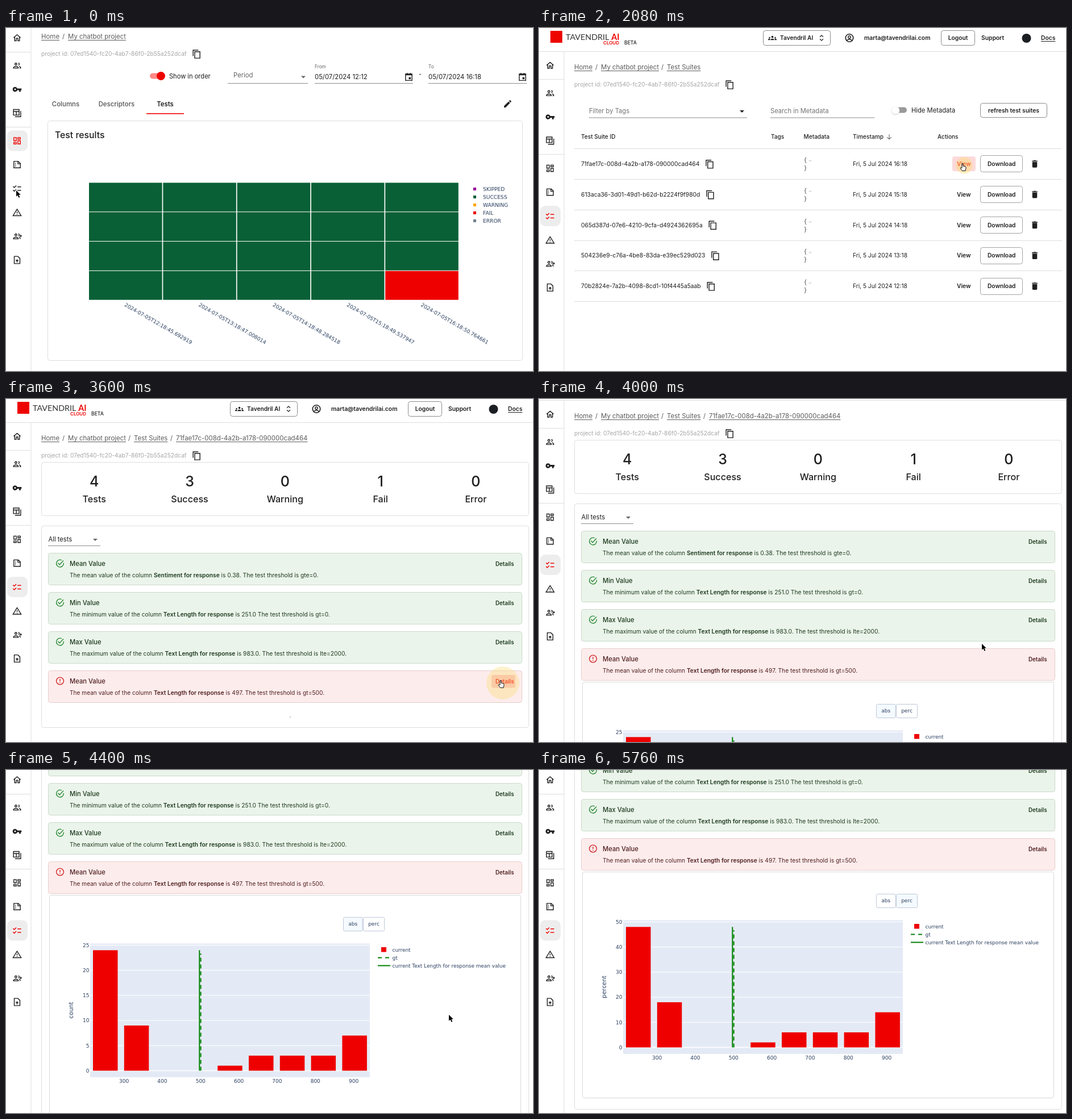
Recreate the animation shown at these times as an HTML page with a canvas. Size 927 by 604 pixels, loop 6320 ms.

```html
<!DOCTYPE html>
<html lang="en">
<head>
<meta charset="utf-8">
<title>Test suites walkthrough</title>
<style>
html, body { margin: 0; width: 100%; height: 100%; overflow: hidden; background: #fff; }
canvas { display: block; width: 927px; height: 604px; }
</style>
</head>
<body>
<canvas id="stage"></canvas>
<script>
const W = 927, H = 604, LOOP = 6320, STEP = 80;
const RED = '#ed0400', INK = '#1f1f1f', GREY = '#666', LINE = '#dedede', SLATE = '#2a3f5f';
const SANS = 'Inter, sans-serif', PLOT = '"DejaVu Sans", sans-serif';
const canvas = document.getElementById('stage');
const g = canvas.getContext('2d');
const dpr = window.devicePixelRatio || 1;
canvas.width = W * dpr;
canvas.height = H * dpr;

// Icons on a 24 unit grid: stroked part | filled part
const person = 'M3 18.5c0-5.5 12-5.5 12 0zM9 6a2.5 2.5 0 1 0 .1 0z';
const ICONS = {
  home: 'M3.5 11.5 12 4l8.5 7.5M6 10v9h4v-6h4v6h4v-9',
  people: person + 'M15 6a2.5 2.5 0 0 1 0 5M17 14q4 1 4 4.5h-3',
  key: '|M12.6 10a6 6 0 1 0 0 4H17v4h4v-4h2v-4zM7 14a2 2 0 1 1 .1 0z',
  table: 'M3 3h14v14H3zM3 8h14M10 8v9M21 7v14H7',
  board: 'M4 4h6v8H4zM14 4h6v4h-6zM14 12h6v8h-6zM4 16h6v4H4z',
  report: 'M4 4h11l5 5v11H4zM14 4v6h6M7 9h2M7 12.5h2M7 16h2',
  checks: 'M2 7l3 3 5-5M2 16l3 3 5-5M13 8h9M13 17h9',
  warn: 'M12 4 22 20H2zM12 10v4M12 16v2',
  invite: person + 'M15 6a2.5 2.5 0 0 1 0 5M17 14q3 1 3 4.5M21 8v6M18 11h6',
  upload: 'M5 3h9l5 5v13H5zM12 18v-6M9 14.5l3-3 3 3',
  copy: 'M3 17V2h13M7 6h13v16H7z',
  calendar: 'M4 5h16v16H4zM4 7h16M8 2v3M16 2v3|M12 13h5v5h-5z',
  pencil: '|M3 17.2V21h3.8L17.8 9.9l-3.7-3.7zM20.7 7a1 1 0 0 0 0-1.4l-2.3-2.3a1 1 0 0 0-1.4 0l-1.8 1.8 3.7 3.7z',
  trash: '|M6 19a2 2 0 0 0 2 2h8a2 2 0 0 0 2-2V7H6zM19 4h-3.5l-1-1h-5l-1 1H5v2h14z',
  account: 'M12 3a9 9 0 1 0 .1 0zM6 18q6-6 12 0M12 7a3 3 0 1 0 .1 0z',
  group: '|M7 18v-2q5-4 10 0v2zM12 6a3 3 0 1 0 .1 0zM0 18v-2q2-3 6-2-1 2-1 4zM24 18v-2q-2-3-6-2 1 2 1 4zM4 9a2 2 0 1 0 .1 0zM20 9a2 2 0 1 0 .1 0z',
  pass: 'M21 11v1a9 9 0 1 1-5-8M7 11l4 4L20.5 5',
  fail: 'M12 3a9 9 0 1 0 .1 0zM12 7v6M12 15v2',
  sorter: 'M7 9l5-5 5 5M7 15l5 5 5-5',
  down: 'M12 4v15M5 13l7 7 7-7',
  chevron: 'M6 9l6 6 6-6'
};
for (const k in ICONS) ICONS[k] = ICONS[k].split('|').map(d => new Path2D(d));
const ARROW = new Path2D('M0 0v10.8l2.5-2.3 1.9 4.2 1.9-.8-1.9-4.1h3.4z');
const HAND = new Path2D('M-1 0q1-1.2 2 0v4l4 1q1.5 .5 1 2.5l-1 5h-5.5l-3.5-5q.5-1.5 3 0z');

function icon(name, x, y, color = INK, size = 17) {
  const [stroke, fill] = ICONS[name], k = size / 24;
  g.save();
  g.translate(x - size / 2, y - size / 2);
  g.scale(k, k);
  g.lineWidth = 2;
  g.strokeStyle = g.fillStyle = color;
  g.stroke(stroke);
  if (fill) g.fill(fill, 'evenodd');
  g.restore();
}

// y is the middle of the capitals; returns the right edge
function text(s, x, y, size, { c = INK, w = 400, a = 'left', f = SANS, u = false } = {}) {
  g.font = `${w} ${size}px ${f}`;
  g.textAlign = a;
  g.fillStyle = c;
  g.fillText(s, x, y + size * 0.364);
  const width = g.measureText(s).width;
  if (u) rule(x, x + width, Math.round(y + size * 0.364) + 2.5, c);
  return x + width;
}
const bold = (s, x, y, size, o) => text(s, x, y, size, { w: 600, ...o });
const plot = (s, x, y, size, o) => text(s, x, y, size, { f: PLOT, c: SLATE, ...o });

function rule(x0, x1, y, c = LINE, lw = 1) {
  seg(x0, y, x1, y, c, lw);
}
function seg(x0, y0, x1, y1, c, lw = 1, dash = []) {
  g.setLineDash(dash);
  g.strokeStyle = c;
  g.lineWidth = lw;
  g.beginPath();
  g.moveTo(x0, y0);
  g.lineTo(x1, y1);
  g.stroke();
  g.setLineDash([]);
}
function rect(x, y, w, h, c) {
  g.fillStyle = c;
  g.fillRect(x, y, w, h);
}
function box(x0, y0, x1, y1, r, fill, stroke) {
  g.beginPath();
  g.roundRect(x0, y0, x1 - x0, y1 - y0, r);
  if (fill) { g.fillStyle = fill; g.fill(); }
  if (stroke) { g.strokeStyle = stroke; g.lineWidth = 1; g.stroke(); }
}
function disc(x, y, r, c) {
  g.fillStyle = c;
  g.beginPath();
  g.arc(x, y, r, 0, 7);
  g.fill();
}
function caret(x, y, c = GREY) {
  g.fillStyle = c;
  g.beginPath();
  g.moveTo(x - 4, y - 2);
  g.lineTo(x + 4, y - 2);
  g.lineTo(x, y + 2);
  g.fill();
}
function shifted(dy, draw) {
  g.save();
  g.translate(0, dy);
  draw();
  g.restore();
}
const ease = u => (u = Math.min(1, Math.max(0, u)), u * u * (3 - 2 * u));
const within = (t, a, b) => t >= a && t < b;

function header() {
  rect(20, 5, 21, 21, RED);
  const logo = 'Lato, sans-serif';
  const end = text('TAVENDRIL', 47, 15.5, 14.3, { f: logo, c: '#333' });
  bold('AI', end + 4, 15.5, 14.3, { f: logo, c: RED, w: 700 });
  bold('CLOUD', 113, 26.5, 8, { c: RED });
  text('BETA', 150, 26, 8.6, { w: 500 });
  box(394.5, 4.5, 512.5, 30.5, 4, null, '#8c8c8c');
  icon('group', 410.5, 17.5, INK, 15);
  bold('Tavendril AI', 424, 17.5, 10.2);
  icon('sorter', 497, 17.5, INK, 14);
  icon('account', 546, 17.5, INK, 18);
  bold('marta@tavendrilai.com', 572, 17.5, 10.3);
  box(707.5, 4.5, 766.5, 30.5, 4, null, '#8c8c8c');
  bold('Logout', 737, 17.5, 10.3, { a: 'center' });
  bold('Support', 778, 17.5, 10.3);
  disc(857.5, 18, 8, '#1b1f23');
  bold('Docs', 883, 17.5, 10.3, { u: true });
  rule(0, W, 41.5);
}

const MENU = { home: 66, people: 114.5, key: 156.5, table: 198.3, board: 247, report: 289,
  checks: 331, warn: 373.3, invite: 415.3, upload: 457 };
function sidebar(t, off) {
  const onBoard = t < 800, pressed = within(t, 240, 1280);
  const cell = y => box(2, y - 18, 38, y + 18, 9, '#ededed');
  seg(44, Math.max(0, 41 - off), 44, H, LINE);
  for (const y of [90, 222]) rule(0, 44, Math.round(y - off) + 0.5);
  if (onBoard) cell(MENU.board - off);
  if (t >= 1280) cell(MENU.checks - off);
  if (pressed) disc(19.5, MENU.checks - off, 17.5, t < 400 ? 'rgba(237,4,0,.05)' : 'rgba(220,0,20,.15)');
  for (const k in MENU) {
    const red = k === 'board' ? t < 1280 : k === 'checks' && t >= 240;
    icon(k, 19.5, MENU[k] - off, red ? RED : INK);
  }
}
function tooltip(off) {
  box(48, 322 - off, 103, 340 - off, 3, '#686868');
  text('Test Suites', 75.5, 331 - off, 8.1, { c: '#fff', a: 'center', w: 500 });
}

const SUITES = ['71fae17c-008d-4a2b-a178-090000cad464', '613aca36-3d01-49d1-b62d-b2224f9f980d',
  '065d387d-07e6-4210-9cfa-d4924362695a', '504236e9-c76a-4be8-83da-e39ec529d023',
  '70b2824e-7a2b-4098-8cd1-10f4445a5aab'];
function crumbs(depth) {
  const xs = [62, 109, 225, 299];
  ['Home', 'My chatbot project', 'Test Suites', SUITES[0]].slice(0, depth).forEach((s, i) => {
    text(s, xs[i], 69, 11.45, { c: '#5c5c5c', u: true });
    if (i) text('/', xs[i] - 8, 69, 11.45, { c: '#5c5c5c', a: 'center' });
  });
  text('project id: 07ed1540-fc20-4ab7-86f0-2b55a252dcaf', 62, 99.5, 10.2, { c: '#a6a6a6' });
  icon('copy', 335.5, 100);
}

function dashboard() {
  box(253, 79.5, 278, 89.5, 5, '#ff8a87');
  disc(272.5, 84.5, 7.5, RED);
  text('Show in order', 287, 84.5, 11.1);
  text('Period', 400, 83, 11.3, { c: GREY });
  caret(523, 86.5);
  rule(390, 531, 97.5, '#8c8c8c');
  text('-', 728.5, 81, 11, { a: 'center' });
  [['From', '12:12', 543], ['To', '16:18', 743]].forEach(([label, hour, x]) => {
    text(label, x, 68, 8.3, { c: GREY });
    text('05/07/2024 ' + hour, x, 86, 11.3);
    icon('calendar', x + 165.5, 86);
    rule(x, x + 173, 97.5, '#8c8c8c');
  });
  bold('Columns', 105, 133.5, 11.3, { c: GREY, a: 'center' });
  bold('Descriptors', 194.5, 133.5, 11.3, { c: GREY, a: 'center' });
  bold('Tests', 280, 133.5, 11.3, { a: 'center' });
  rect(247, 150, 66, 1.6, RED);
  icon('pencil', 882.5, 133.5);
  box(73.5, 163.5, 908.5, 585.5, 4, null, LINE);
  text('Test results', 86, 188, 15.8, { w: 500 });
  for (let c = 0; c < 5; c++) {
    const x = 146 + 130.3 * c;
    for (let r = 0; r < 4; r++)
      rect(x, 272.5 + 51.8 * r, 128.6, 50.8, c === 4 && r === 3 ? '#ee0000' : '#0a6036');
    const sec = ['45.692919', '47.008014', '48.284518', '49.537947', '50.764661'][c];
    g.save();
    g.translate(x + 63.5, 486.5);
    g.rotate(Math.PI / 6);
    plot(`2024-07-05T${12 + c}:18:${sec}`, 0, 0, 9);
    g.restore();
  }
  const legend = { SKIPPED: '#990099', SUCCESS: '#0a5f38', WARNING: '#ffa500', FAIL: RED, ERROR: '#708090' };
  Object.entries(legend).forEach(([name, c], i) => {
    rect(822, 281 + 14 * i, 5, 5, c);
    plot(name, 839, 283.5 + 14 * i, 9.1);
  });
}

function suiteList(t) {
  text('Filter by Tags', 88, 146, 11.2, { c: '#737373' });
  caret(357, 147, INK);
  rule(88, 366, 158, '#8c8c8c');
  text('Search in Metadata', 407, 146, 11.2, { c: '#737373' });
  rule(407, 590, 158, '#8c8c8c');
  box(624, 139.5, 647, 149.5, 5, '#999');
  disc(627, 145.5, 7.4, '#c9c9c9');
  disc(627, 145, 7, '#fff');
  text('Hide Metadata', 655, 145, 11.2);
  box(776.5, 132.5, 893.5, 157.5, 4, null, '#8c8c8c');
  bold('refresh test suites', 835, 145, 10.3, { a: 'center' });
  const heads = { 'Test Suite ID': 74, Tags: 408, Metadata: 465.5, Timestamp: 552, Actions: 701 };
  for (const s in heads) text(s, heads[s], 191.5, 10.1, { w: 500 });
  icon('down', 616, 191.5, GREY, 13);
  rule(62, 920, 212.5);
  SUITES.forEach((id, i) => {
    const y = 239.3 + 53.8 * i, hot = i === 0 && t >= 1920;
    const end = text(id, 74, y, 10.3);
    icon('copy', end + 18, y + 0.5);
    const mono = { f: '"DejaVu Sans Mono", monospace', c: '#555' };
    text('{', 465.5, y - 7, 10, mono);
    icon('chevron', 477, y - 5.5, '#999', 9);
    text('}', 465.5, y + 7, 10, mono);
    text(`Fri, 5 Jul 2024 ${16 - i}:18`, 552, y, 10.2);
    if (hot) box(727, y - 13, 768, y + 13, 4, t >= 2080 ? 'rgba(237,4,0,.15)' : 'rgba(237,4,0,.05)');
    bold('View', 735, y, 10.2, { c: hot ? RED : INK });
    box(776.5, Math.round(y) - 14.5, 850.5, Math.round(y) + 14.5, 4, null, '#a3a3a3');
    bold('Download', 813.7, y, 10.2, { a: 'center' });
    icon('trash', 872, y);
    rule(62, 920, Math.round(y + 26.7) + 0.5);
  });
}

const LEN = 'Text Length for response';
const CHECKS = [
  ['Mean Value', 'mean', 'Sentiment for response', ' is 0.38. The test threshold is gte=0.'],
  ['Min Value', 'minimum', LEN, ' is 251.0 The test threshold is gt=0.'],
  ['Max Value', 'maximum', LEN, ' is 983.0. The test threshold is lte=2000.'],
  ['Mean Value', 'mean', LEN, ' is 497. The test threshold is gt=500.']];
function suite(t) {
  const open = t >= 3760;
  box(62.5, 111.5, 919.5, 205.5, 4, null, LINE);
  ['Tests', 'Success', 'Warning', 'Fail', 'Error'].forEach((s, i) => {
    const x = 155.2 + 167.8 * i;
    text('43010'[i], x, 144.5, 25, { a: 'center', w: 500 });
    text(s, x, 176, 16.1, { a: 'center', w: 500 });
  });
  box(62.5, 223.5, 919.5, open ? 955.5 : t >= 3600 ? 578.5 : 553.5, 4, null, LINE);
  text('All tests', 74.5, 247, 11.2);
  caret(157, 248);
  rule(74, 166, 258.5, '#8c8c8c');
  CHECKS.forEach(([title, kind, column, rest], i) => {
    const y = 271.5 + 69 * i, bad = i === 3, c = bad ? '#4f1f1f' : '#1c3a1f';
    box(74.5, y, 907.5, y + 56, 4, bad ? '#fdecec' : '#ebf4ea', bad ? '#e6cdcd' : '#ccd9cc');
    icon(bad ? 'fail' : 'pass', 95, y + 18, bad ? '#d32f2f' : '#2e8b3a');
    text(title, 112, y + 18.5, 11.2, { c, w: 500 });
    let x = text(`The ${kind} value of the column `, 112, y + 39, 10.15, { c });
    x = bold(column, x, y + 39, 10.25, { c });
    text(rest, x, y + 39, 10.25, { c });
    const hot = bad && within(t, 3360, 3680);
    if (hot) box(854, y + 7.5, 896, y + 30, 3, t >= 3520 ? 'rgba(237,4,0,.19)' : 'rgba(237,4,0,.05)');
    bold('Details', 861, y + 19.3, 9.8, { c: hot ? RED : c });
  });
  if (within(t, 3600, 3760)) disc(500, 560, t < 3680 ? 0.8 : 1.5, '#777');
  if (open) chart(t >= 5200, within(t, 4960, 5440));
}

function chart(percent, hot) {
  box(76.5, 537.5, 905.5, 935.5, 3, '#fff', '#d9d9d9');
  const tab = (s, x0, x1, on) => {
    box(x0, 576.5, x1, 600.5, 2, on ? '#f4faff' : '#fff', '#bec8d9');
    plot(s, (x0 + x1) / 2, 588, 9, { a: 'center' });
  };
  tab('abs', 593.5, 627, !percent);
  tab('perc', 628.5, 665.5, percent || hot);
  const base = 846.5, unit = 8.84;
  rect(148, 622.5, 492, 235.5, '#e4eaf5');
  for (let i = 0; i <= 5; i++) {
    const y = base - 5 * unit * i;
    rule(148, 640, y, '#fff', i ? 1 : 1.6);
    plot(String(i * (percent ? 10 : 5)), 146.5, y, 9, { a: 'right' });
  }
  [24, 9, 0, 0, 1, 3, 3, 3, 7].forEach((n, i) => rect(153 + 54.8 * i, base - n * unit, 43.5, n * unit, '#ee0000'));
  const top = base - 24 * unit;
  seg(340.3, top, 340.3, base, '#008000', 2);
  seg(342.6, base, 342.6, top + 6, '#008000', 2, [7, 5]);
  for (let i = 0; i < 7; i++) plot(String(300 + 100 * i), 207.6 + 67.33 * i, 864.5, 9, { a: 'center' });
  g.save();
  g.translate(114.5, 740);
  g.rotate(-Math.PI / 2);
  plot(percent ? 'percent' : 'count', 0, 0, 10.4, { a: 'center' });
  g.restore();
  rect(660, 629, 9, 8.5, '#ee0000');
  seg(654, 647.5, 676, 647.5, '#008000', 2, [7, 6]);
  rule(654, 676, 661.5, '#008000', 2);
  ['current', 'gt', `current ${LEN} mean value`].forEach((s, i) => plot(s, 679.5, 633.5 + 14 * i, 8.9));
}

// Pointer stops: time, x, y
const STOPS = [[0, 18, 286], [1160, 18, 286], [2000, 745, 239], [2880, 745, 239], [3360, 870, 496],
  [3680, 870, 496], [3920, 779, 431], [4560, 779, 431], [5040, 646, 228], [5440, 646, 228], [5760, 685, -30]];
const HANDS = [[240, 800], [1920, 2640], [3360, 3680], [4960, 5440]];
const CLICKS = [[400, 20, 290], [2080, 748, 242], [3520, 874, 500], [5120, 650, 232]];
function pointer(t) {
  for (const [at, x, y] of CLICKS) {
    const age = t - at;
    if (within(age, 0, 240))
      disc(x, y, 29 * Math.min(1, (age + 80) / 160), `rgba(250,220,115,${0.45 * (1 - age / 400)})`);
  }
  const i = STOPS.findIndex(s => s[0] > t);
  if (i < 1) return;
  const [t0, x0, y0] = STOPS[i - 1], [t1, x1, y1] = STOPS[i], k = ease((t - t0) / (t1 - t0));
  const hand = HANDS.some(([a, b]) => within(t, a, b));
  g.save();
  g.translate(x0 + (x1 - x0) * k, y0 + (y1 - y0) * k);
  g.lineWidth = hand ? 1 : 1.4;
  g.strokeStyle = hand ? '#111' : '#fff';
  g.fillStyle = hand ? '#fff' : '#000';
  const shape = hand ? HAND : ARROW;
  if (hand) { g.fill(shape); g.stroke(shape); }
  else { g.stroke(shape); g.fill(shape); }
  g.restore();
}

function draw(t) {
  const scroll = t < 800 ? 54 : Math.round(358 * ease((t - 3860) / 684.5));
  const off = Math.min(scroll, 48.5);
  g.setTransform(dpr, 0, 0, dpr, 0, 0);
  rect(0, 0, W, H, '#fff');
  shifted(-scroll, () => {
    header();
    crumbs(t < 800 ? 2 : t < 2640 ? 3 : 4);
    if (within(t, 800, 2640)) suiteList(t);
    if (t >= 2640) suite(t);
  });
  if (t < 800) dashboard();
  sidebar(t, off);
  if (within(t, 400, 1280)) tooltip(off);
  pointer(t);
}

function tick() {
  const t = performance.now() % LOOP;
  draw(Math.floor(t / STEP) * STEP);
  requestAnimationFrame(tick);
}
tick();
</script>
</body>
</html>
```
